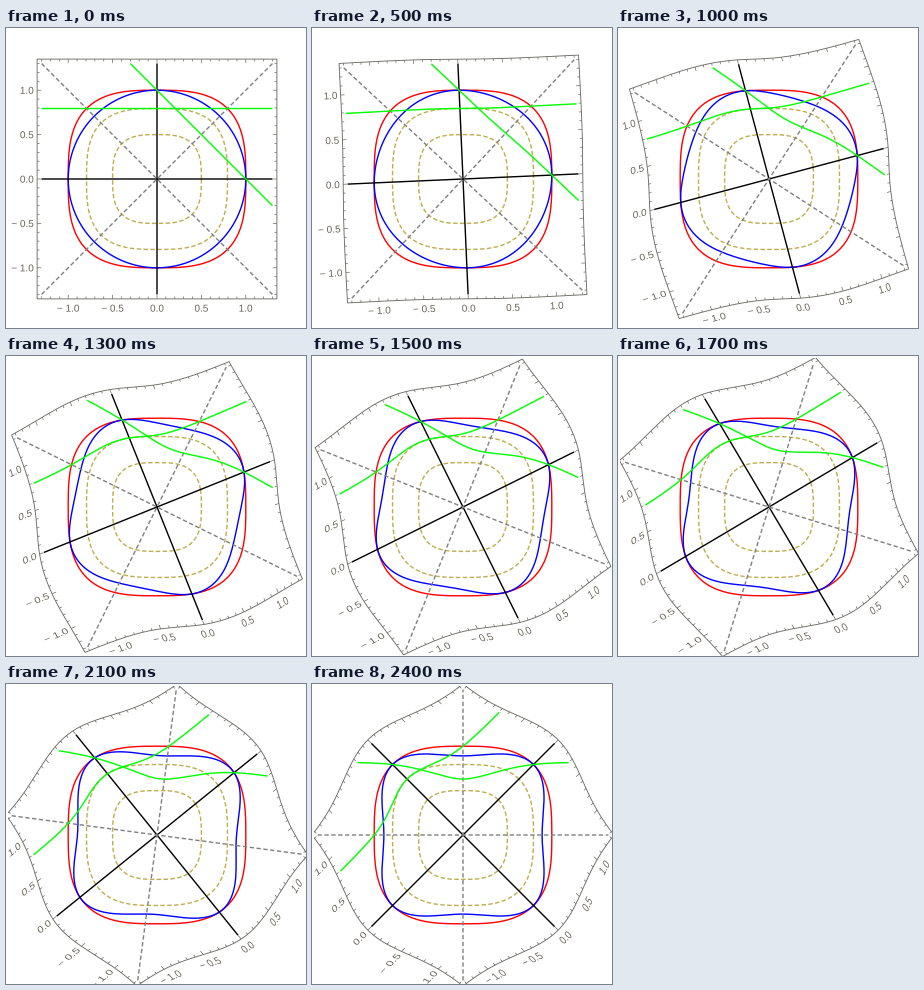
These frames come from a looping animation (300 by 300 pixels, 2900 ms). A matplotlib script:

```python
import numpy as np
import matplotlib.pyplot as plt
from matplotlib.animation import FuncAnimation
from matplotlib.patches import PathPatch
from matplotlib.path import Path
from matplotlib.textpath import TextPath

P = 3                  # exponent of the norm whose unit circle stays fixed
SCALE = 88.8           # pixels per unit
EDGE = 1.35            # half side of the plot frame
REACH = 1.3            # half length of the plotted lines
DIAG = 0.5 ** (1 / P)  # coordinate of the unit curve on the diagonal
STEPS = 20
WIDTH = 1.4            # curve width in pixels
GREY = "#6b6b66"


def norm(x, y):
    return (np.abs(x) ** P + np.abs(y) ** P) ** (1 / P)


# Table between the ordinary angle and the swept-area parameter.
angles = np.linspace(0, 2 * np.pi, 8001)
density = norm(np.cos(angles), np.sin(angles)) ** -2
swept = np.concatenate(
    ([0], np.cumsum((density[1:] + density[:-1]) / 2 * np.diff(angles))))
FULL = swept[-1]


def turn(points, shift):
    """Rotate along the P-norm circles by an area parameter."""
    x, y = np.asarray(points, float).T
    angle = np.arctan2(y, x) % (2 * np.pi)
    param = (np.interp(angle, angles, swept) + shift) % FULL
    angle = np.interp(param, swept, angles)
    c, s = np.cos(angle), np.sin(angle)
    r = norm(x, y) / norm(c, s)
    return np.column_stack((r * c, r * s))


def segment(a, b, n=201):
    return np.linspace(a, b, n)


def circle(radius):
    return radius * np.column_stack((np.cos(angles), np.sin(angles)))[::20]


def p_circle(radius):
    ring = circle(1)
    return radius * ring / norm(*ring.T)[:, None]


def frame_box():
    corners = EDGE * np.array([(-1, -1), (1, -1), (1, 1), (-1, 1), (-1, -1)])
    return np.vstack([segment(a, b) for a, b in zip(corners, corners[1:])])


def tick_marks():
    gap = (np.nan, np.nan)
    marks = []
    for i in range(-13, 14):
        v = i / 10
        inner = EDGE - (4 if i % 5 == 0 else 2.4) / SCALE
        for side in (-1, 1):
            marks += [(v, side * EDGE), (v, side * inner), gap,
                      (side * EDGE, v), (side * inner, v), gap]
    return np.array(marks)


def label_path(value, vertical):
    text = f"{abs(value):.1f}"
    if value < 0:
        text = "\u2212 " + text
    path = TextPath((0, 0), text, size=10, prop={"family": "Liberation Sans"})
    box = path.get_extents()
    if vertical:
        anchor, corner = (-1.392, value), (box.x1, 3.6)
    else:
        anchor, corner = (value, -1.453), ((box.x0 + box.x1) / 2, 3.6)
    return Path((path.vertices - corner) / SCALE + anchor, path.codes)


fig = plt.figure(figsize=(3, 3), dpi=100, facecolor="white")
ax = fig.add_axes([2 / 300, 0, 298 / 300, 298 / 300])
ax.set_axis_off()
half = 149 / SCALE
ax.set_xlim(-half, half)
ax.set_ylim(-half, half)

curves = []


def add_curve(points, color, width=WIDTH, dash=None):
    style = (0, dash) if dash else "-"
    line, = ax.plot([], [], color=color, lw=width * 0.72, ls=style, snap=False,
                    dash_capstyle="butt", solid_capstyle="butt")
    curves.append((line, points))


add_curve(frame_box(), GREY, 0.9)
add_curve(tick_marks(), GREY, 0.7)
for radius in (0.5, DIAG):
    add_curve(p_circle(radius), "#bfae50", dash=(3.2, 1.7))
add_curve(p_circle(1), "#ff0000")
add_curve(circle(1), "#0000ff")
add_curve(segment((-REACH, 0), (REACH, 0)), "black")
add_curve(segment((0, -REACH), (0, REACH)), "black")
for sign in (1, -1):
    add_curve(segment((-REACH, -sign * REACH), (REACH, sign * REACH)),
              "#808080", dash=(3.1, 1.8))
add_curve(segment((-REACH, DIAG), (REACH, DIAG)), "#00ff00")
add_curve(segment((1 - REACH, REACH), (REACH, 1 - REACH)), "#00ff00")

labels = []
for vertical in (False, True):
    for value in (-1, -0.5, 0, 0.5, 1):
        path = label_path(value, vertical)
        patch = PathPatch(path, facecolor="#68645a", lw=0, snap=False)
        ax.add_patch(patch)
        labels.append((patch, path))


def update(i):
    step = min(max(i - 4, 0), STEPS)
    shift = FULL / 8 * step / STEPS
    for line, points in curves:
        line.set_data(*turn(points, shift).T)
    for patch, path in labels:
        patch.set_path(Path(turn(path.vertices, shift), path.codes))
    return [artist for artist, _ in curves + labels]


anim = FuncAnimation(fig, update, frames=29, interval=100,
                     init_func=lambda: update(0), repeat=True, repeat_delay=0)
plt.show()
```
